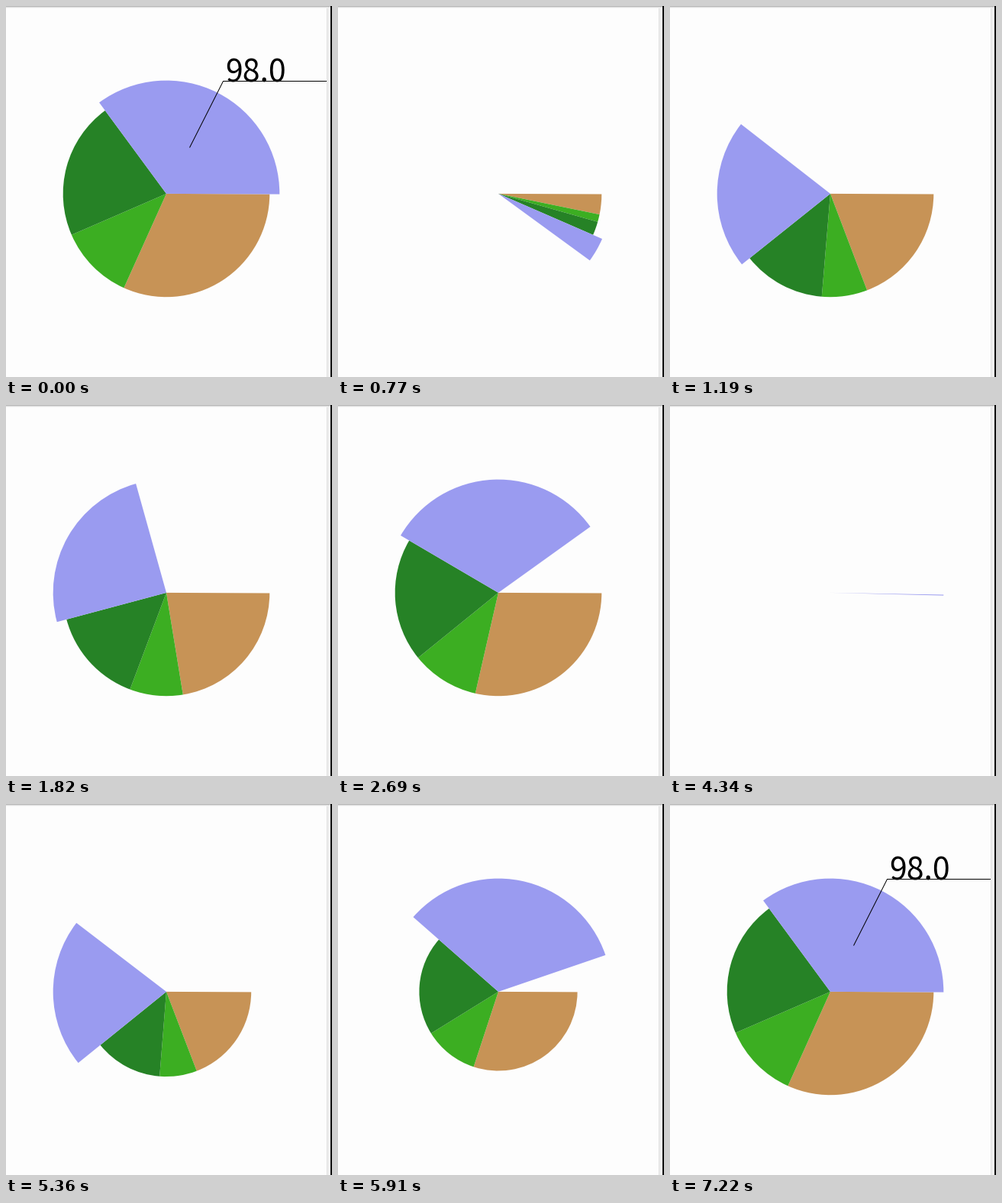
Animation of 427x486 px, one loop 8 s. Source, as a matplotlib script:

```python
import math

import matplotlib.pyplot as plt
from matplotlib.animation import FuncAnimation
from matplotlib.patches import Rectangle, Wedge

W, H, DPI = 427, 486, 64
LOOP, TICK = 8000, 20
PX = 72 / DPI  # points per pixel

CENTER = (210, 245.9)
RADIUS, SELECTED_RADIUS = 135.3, 148.3
START_ANGLE = 0.25
SLICES = [(114.0, "#c79356"), (42.3, "#3cae22"), (77.1, "#268226"), (126.6, "#9a9bf0")]
SELECTED = 3

# Times at which the screen refreshes during the two animations.
REFRESH = [
    0, 500, 620, 770, 890, 1040, 1190, 1320, 1460, 1580, 1700, 1820, 1970,
    2120, 2270, 2420, 2540, 2690, 2840, 2960, 3110, 3230, 3380,
    4340, 4460, 4580, 4700, 4850, 4970, 5090, 5240, 5360, 5510, 5630, 5780,
    5910, 6050, 6170, 6290, 6440, 6560, 6680, 6800, 6950, 7070, 7220,
]
SPIN_START, GROW_START = 483, 4270
LONG, SHORT = 2887, 1925


def progress(t, start, duration):
    return min(max((t - start) / duration, 0), 1)


def bounce(x):
    x *= 1.1226
    if x < 0.3535:
        return 8 * x * x
    if x < 0.7408:
        return 8 * (x - 0.54719) ** 2 + 0.7
    if x < 0.9644:
        return 8 * (x - 0.8526) ** 2 + 0.9
    return min(8 * (x - 1.0435) ** 2 + 0.95, 1)


def ease_in_out(x):
    return 0.5 - 0.5 * math.cos(math.pi * x)


def pose(t):
    """Return sweep fraction, radius fraction and label visibility."""
    if 500 <= t < 3380:
        return bounce(progress(t, SPIN_START, LONG)), 1, False
    if 4340 <= t < 7220:
        sweep = ease_in_out(progress(t, GROW_START, SHORT))
        return sweep, bounce(progress(t, GROW_START, LONG)), False
    return 1, 1, True


fig = plt.figure(figsize=(W / DPI, H / DPI), dpi=DPI, facecolor="#fdfdfd")
ax = fig.add_axes([0, 0, 1, 1])
ax.set_xlim(0, W)
ax.set_ylim(H, 0)
ax.axis("off")


def rect(x, y, w, h, color):
    ax.add_patch(Rectangle((x, y), w, h, fc=color, lw=0, zorder=0))


rect(420, 0, 1, H, "#dedede")
rect(421, 0, 4, H, "#f1f1f1")
for row, shade in enumerate(("#b8b8b8", "#dadada", "#f3f3f3")):
    rect(0, row, 425, 1, shade)
rect(425, 0, 2, H, "black")

wedges = [
    ax.add_patch(Wedge(CENTER, RADIUS, 0, 1, fc=color, lw=0, zorder=2))
    for _, color in SLICES
]
leader, = ax.plot([240.5, 284.5, 420], [185.5, 98.5, 98.5], color="black",
                  lw=PX, solid_capstyle="butt", zorder=3)
label = ax.text(287.5, 99.6, "98.0", fontsize=41 * PX, color="black",
                family=["Noto Sans CJK JP", "Liberation Sans"],
                va="baseline", zorder=4)


def draw(frame):
    now = frame * TICK + TICK / 2
    sweep, scale, labelled = pose(max(r for r in REFRESH if r <= now))
    angle = START_ANGLE
    for i, (wedge, (size, _)) in enumerate(zip(wedges, SLICES)):
        wedge.set_theta1(angle)
        angle += size * sweep
        wedge.set_theta2(angle)
        wedge.set_radius(SELECTED_RADIUS if i == SELECTED else RADIUS * scale)
    leader.set_visible(labelled)
    label.set_visible(labelled)
    return [*wedges, leader, label]


anim = FuncAnimation(fig, draw, frames=LOOP // TICK, interval=TICK,
                     repeat=True, repeat_delay=0)
plt.show()
```
